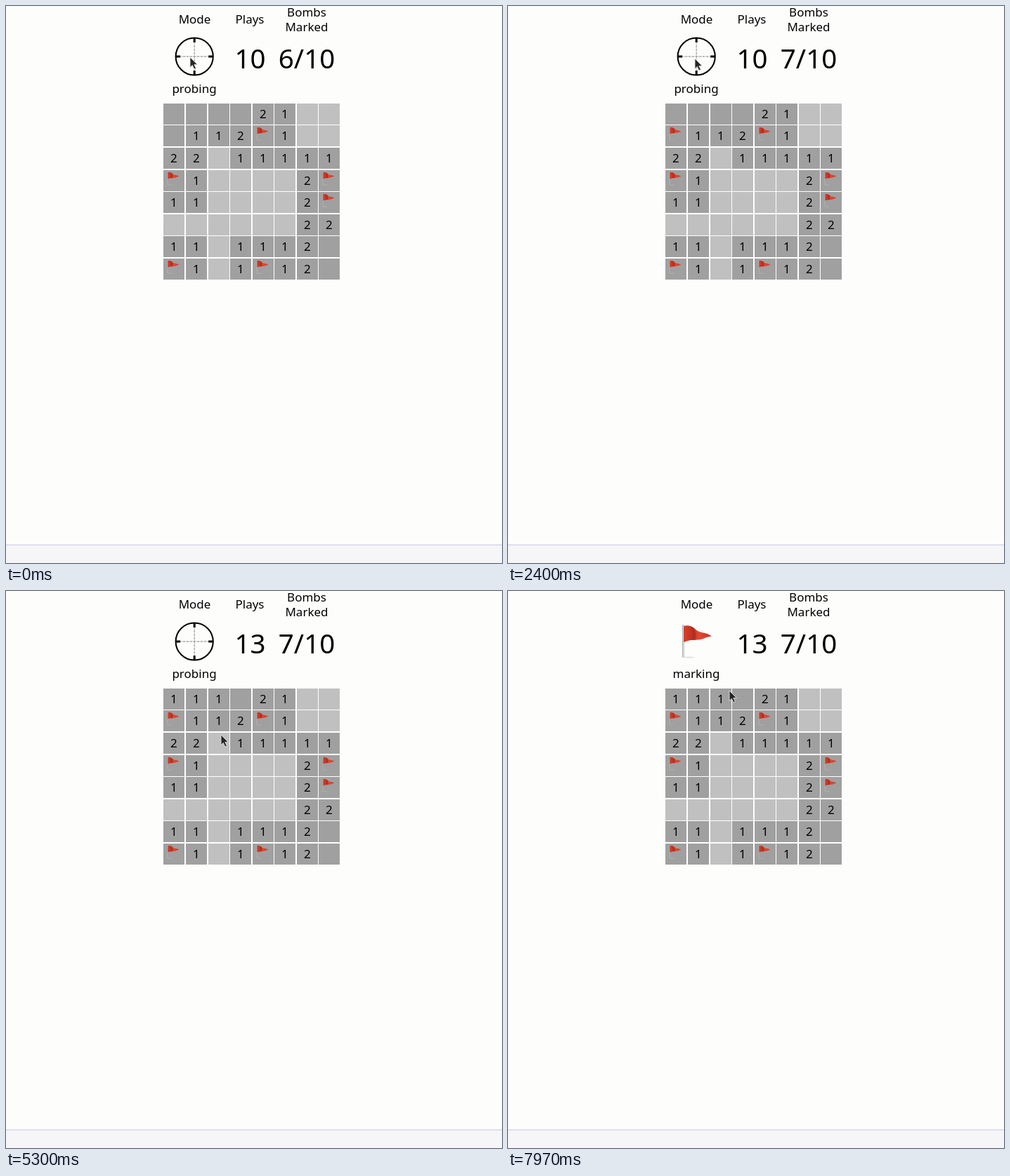
An HTML page for the animation above (8000 ms loop, 706 by 794 pixels).

```html
<!DOCTYPE html>
<html lang="en">
<head>
<meta charset="utf-8">
<title>Minesweeper</title>
<style>
  html, body { margin: 0; width: 100%; height: 100%; overflow: hidden; background: #fdfdfc; }
  svg { display: block; width: 706px; height: 794px; }
  text { font: 17px "Noto Sans", "Open Sans", sans-serif; text-anchor: middle; fill: #000; }
  .big { font-size: 38.5px; }

  .timed { animation: 8s step-end infinite; }
  .probing { animation-name: probing; }
  .marking { animation-name: marking; }
  .marked6 { animation-name: marked6; }
  .marked7 { animation-name: marked7; }
  .plays10 { animation-name: plays10; }
  .plays11 { animation-name: plays11; }
  .plays12 { animation-name: plays12; }
  .plays13 { animation-name: plays13; }
  .reveal1 { animation-name: reveal1; }
  .reveal2 { animation-name: reveal2; }

  @keyframes probing { 0% { opacity: 1 } 1.6% { opacity: 0 } 29.4% { opacity: 1 } 95.5%, 100% { opacity: 0 } }
  @keyframes marking { 0% { opacity: 0 } 1.6% { opacity: 1 } 29.4% { opacity: 0 } 95.5%, 100% { opacity: 1 } }
  @keyframes marked6 { 0% { opacity: 1 } 12.5%, 100% { opacity: 0 } }
  @keyframes marked7 { 0% { opacity: 0 } 12.5%, 100% { opacity: 1 } }
  @keyframes plays10 { 0% { opacity: 1 } 43.75%, 100% { opacity: 0 } }
  @keyframes plays11 { 0% { opacity: 0 } 43.75% { opacity: 1 } 53.75%, 100% { opacity: 0 } }
  @keyframes plays12 { 0% { opacity: 0 } 53.75% { opacity: 1 } 62.5%, 100% { opacity: 0 } }
  @keyframes plays13 { 0% { opacity: 0 } 62.5%, 100% { opacity: 1 } }
  @keyframes reveal1 { 0% { opacity: 0 } 43.75%, 100% { opacity: 1 } }
  @keyframes reveal2 { 0% { opacity: 0 } 53.75%, 100% { opacity: 1 } }

  #cursor { animation: roam 8s ease-in-out infinite; }
  @keyframes roam {
    0%, 2.5% { transform: translate(262px, 73px) }
    10%, 14.5% { transform: translate(237px, 184px) }
    20.9%, 21.2% { transform: translate(265px, 163px) }
    26.6%, 30% { transform: translate(266px, 75px) }
    33.4%, 35.4% { transform: translate(262px, 86px); animation-timing-function: linear }
    40.9% { transform: translate(243px, 136px); animation-timing-function: ease-out }
    43%, 46% { transform: translate(240px, 149px) }
    52%, 57.2% { transform: translate(270px, 150px) }
    61.2%, 63% { transform: translate(302px, 151px) }
    66.3%, 67.5% { transform: translate(306px, 205px) }
    74.6%, 78.4% { transform: translate(326px, 242px) }
    81.4% { transform: translate(330px, 355px) }
    84.6%, 92.9% { transform: translate(338px, 163px) }
    95.1%, 96% { transform: translate(268px, 74px) }
    99.6%, 100% { transform: translate(315px, 142px) }
  }
</style>
</head>
<body>
<svg viewBox="0 0 706 794">
  <defs>
    <linearGradient id="cloth">
      <stop offset="0" stop-color="#d8402c"/>
      <stop offset=".25" stop-color="#c43322"/>
      <stop offset=".55" stop-color="#e04a34"/>
      <stop offset="1" stop-color="#c93425"/>
    </linearGradient>
    <linearGradient id="pole">
      <stop offset="0" stop-color="#8b8b92"/>
      <stop offset=".5" stop-color="#e4e4e8"/>
      <stop offset="1" stop-color="#b4b4b8"/>
    </linearGradient>
    <g id="cloth-shape">
      <path d="M2 2C8 0 13 2 17 5C21 9 25 11 30 11.5C35 12 38 14 42 16.5C37 17 34 18 30 20C26 22 22 21 18 22C13 21 8 23 2 25Z" fill="url(#cloth)"/>
      <path d="M12 2Q16 12 13 22L18 22Q22 14 17 5Z" fill="#9f2418" opacity=".55"/>
    </g>
    <g id="flag">
      <ellipse cx="9" cy="46.5" rx="9" ry="1.2" fill="#e6e4da"/>
      <rect width="3" height="47" rx="1" fill="url(#pole)"/>
      <use href="#cloth-shape"/>
    </g>
    <g id="small-flag" transform="translate(5.5 2.5) scale(.4)">
      <rect y="1" width="2.5" height="44" fill="#b2b2b2"/>
      <ellipse cx="9" cy="46" rx="9" ry="1.5" fill="#b0afaa"/>
      <use href="#cloth-shape"/>
    </g>
  </defs>

  <rect width="706" height="794" fill="#fdfdfc"/>
  <rect y="768" width="706" height="26" fill="#f6f6f8"/>
  <rect y="767.5" width="706" height="1.5" fill="#d5d6ec"/>

  <text x="268.5" y="25">Mode</text>
  <text x="347" y="25">Plays</text>
  <text x="428" y="15">Bombs</text>
  <text x="428" y="36">Marked</text>

  <g class="timed probing">
    <g transform="translate(268.2 72)" fill="none" stroke="#000">
      <circle r="26.6" stroke-width="2"/>
      <path d="M-21 0H21M0-21V21" stroke="#aaa" stroke-width=".8"/>
      <path d="M-15 0H16M0-15V16" stroke="#888" stroke-width="2" stroke-dasharray=".8 4.2"/>
      <path d="M-26 0H-20M20 0H26M0-26V-20M0 20V26" stroke-width="3"/>
    </g>
    <text x="268" y="124">probing</text>
  </g>
  <g class="timed marking">
    <use href="#flag" x="248" y="48"/>
    <text x="268" y="124">marking</text>
  </g>

  <g id="plays"></g>
  <text class="big timed marked6" x="428" y="89">6/10</text>
  <text class="big timed marked7" x="428" y="89">7/10</text>

  <rect x="222" y="137" width="255" height="255" fill="#fff"/>
  <g id="board"></g>

  <path id="cursor" d="M0 0V14.5L3.3 11.5L5.8 17L8.4 15.8L5.9 10.4H10.3Z" fill="#262626" stroke="#e2e2e2" stroke-width=".9"/>
</svg>
<script>
  // Digits and F are shown, "." is covered, "_" is empty;
  // a, b, c turn into a 1 and m into a flag during the loop.
  const rows = [
    "abc.21__",
    "m112F1__",
    "22_11111",
    "F1____2F",
    "11____2F",
    "______22",
    "11_1112.",
    "F1_1F12."
  ];
  const changing = {
    a: ["1", "reveal1"],
    b: ["1", "reveal2"],
    c: ["1", "plays13"],
    m: ["F", "marked7"]
  };

  function cell(code, col, row) {
    const x = Math.round(224.4 + 31.55 * col);
    const y = Math.round(138.8 + 31.6 * row);
    const [mark, timing] = changing[code] || [code, ""];
    const cls = timing && `class="timed ${timing}"`;
    let content = "";
    if (mark === "F") content = `<use href="#small-flag" ${cls}/>`;
    else if (/\d/.test(mark)) content = `<text x="14.8" y="21" ${cls}>${mark}</text>`;
    return `<g transform="translate(${x} ${y})">
      <rect width="30" height="30" fill="${mark === "_" ? "#c0c0c0" : "#a0a0a0"}"/>${content}</g>`;
  }

  document.getElementById("board").innerHTML =
    rows.map((line, row) => [...line].map((code, col) => cell(code, col, row)).join("")).join("");

  document.getElementById("plays").innerHTML = [10, 11, 12, 13].map(n =>
    `<text class="big timed plays${n}" x="347.5" y="89">${n}</text>`).join("");
</script>
</body>
</html>
```
